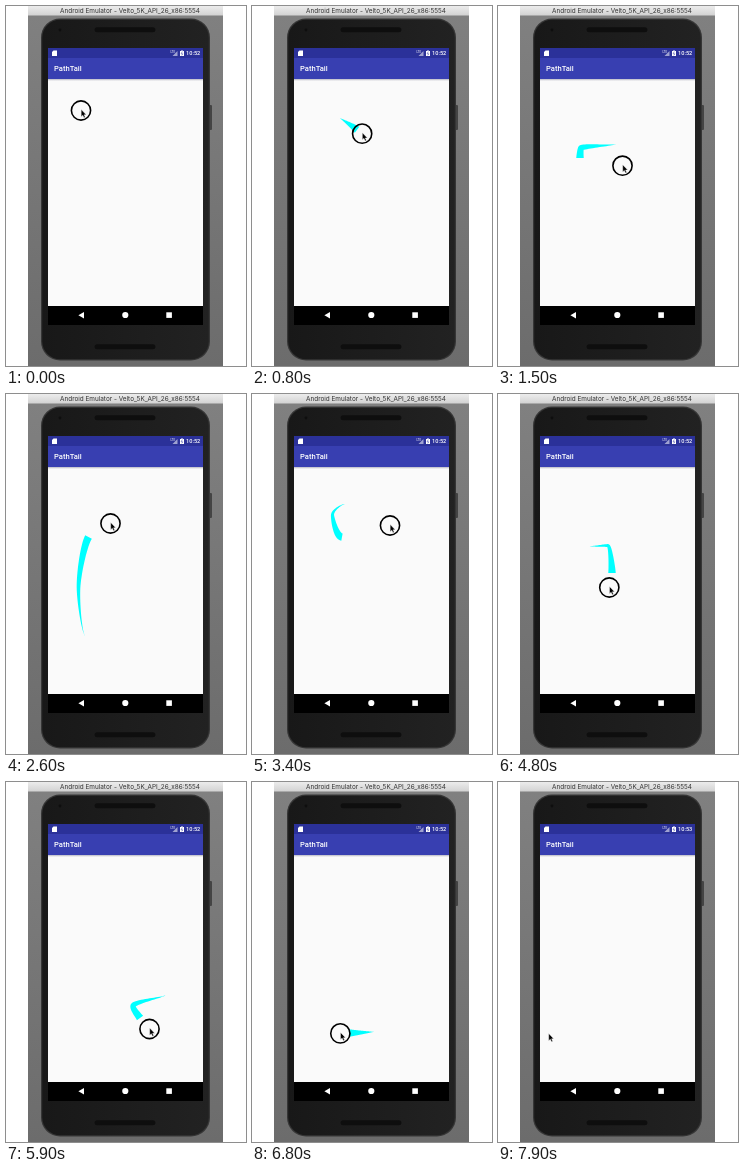
Write an HTML page that moves like this. It is 240 px wide and 360 px high and loops after 8000 ms.

```html
<!DOCTYPE html>
<html lang="en">
<head>
<meta charset="utf-8">
<title>PathTail</title>
<style>
  html, body { margin: 0; width: 100%; height: 100%; overflow: hidden; background: #fff; }
  svg { display: block; width: 100vw; height: 100vh; }
  text { font-family: Roboto, sans-serif; fill: #fff; }
</style>
</head>
<body>
<svg viewBox="0 0 240 360">
  <defs>
    <linearGradient id="bar" x2="0" y2="1"><stop stop-color="#ececec"/><stop offset="1" stop-color="#d2d2d2"/></linearGradient>
    <linearGradient id="desk" x2="0" y2="1"><stop stop-color="#808080"/><stop offset="1" stop-color="#6c6c6c"/></linearGradient>
    <linearGradient id="body"><stop stop-color="#181818"/><stop offset="1" stop-color="#222"/></linearGradient>
    <linearGradient id="shade" x2="0" y2="1"><stop stop-color="#b8b8c4"/><stop offset="1" stop-color="#fafafa"/></linearGradient>
  </defs>
  <rect x="22" y="9" width="195" height="351" fill="url(#desk)"/>
  <rect x="22" width="195" height="9.5" fill="url(#bar)"/>
  <text x="124" y="7" text-anchor="middle" style="font:6.4px Inter,sans-serif;fill:#333">Android Emulator - Velto_5K_API_26_x86:5554</text>

  <!-- phone -->
  <rect x="203" y="99" width="3" height="25" rx="1" fill="#444"/>
  <rect x="35" y="12.5" width="169" height="342" rx="19" fill="#363636"/>
  <rect x="36.2" y="13.7" width="166.6" height="339.6" rx="18" fill="url(#body)"/>
  <g fill="#0e0e0e">
    <rect x="88.6" y="21.2" width="60.8" height="5" rx="2.5"/>
    <rect x="88.6" y="338.2" width="60.8" height="5" rx="2.5"/>
    <circle cx="54" cy="24" r="1.4"/>
  </g>

  <!-- screen -->
  <rect x="42" y="42" width="155" height="258" fill="#fafafa"/>
  <rect x="42" y="42" width="155" height="10.5" fill="#2b3199"/>
  <rect x="42" y="52" width="155" height="21" fill="#383fb1"/>
  <rect x="42" y="73" width="155" height="2" fill="url(#shade)"/>
  <rect x="42" y="300" width="155" height="19" fill="#000"/>
  <g fill="#fff">
    <path d="M47.5 44.5H51V50H46V46Z"/>
    <path d="M171.5 45V50H166.5Z" opacity=".55"/>
    <path d="M175 44.4H177V45H178V50H174V45H175Z"/>
    <path d="M78 306V312.4L72.4 309.2Z"/>
    <circle cx="119.3" cy="309" r="3.1"/>
    <rect x="160.3" y="306.3" width="5.6" height="5.6"/>
  </g>
  <path d="M176.3 45.6L175.1 47.8H176.8L175.8 49.4" fill="none" stroke="#2b3199" stroke-width=".5"/>
  <text x="164.4" y="47" font-size="3">LTE</text>
  <text id="clock" x="194.3" y="49.4" text-anchor="end" font-size="5.6" font-weight="500"></text>
  <text x="48" y="65.2" font-size="7.6" font-weight="500">PathTail</text>

  <path id="tail" fill="#0ff"/>
  <g id="pointer">
    <circle id="ring" r="9.6" fill="none" stroke="#000" stroke-width="1.6"/>
    <path d="M.2 -1V6.2L1.8 4.7L3 7.3L4.2 6.7L3.1 4.3H5.2Z" fill="#000" stroke="#fff" stroke-width=".4"/>
  </g>
</svg>
<script>
const LOOP = 8000, STEP = 100, RELEASE = 7400, MINUTE = 7000;
const NEAR = 100, FAR = 400, WIDTH = 7.5;

// a flick ending at time t: start, bend, brake and stop, at fixed lead times
const flick = (t, ...points) =>
  points.map((p, i) => [t - [FAR, 230, NEAR, 0][i], ...p]);

const keys = [
  [0, 75, 104.5],
  ...flick(1500, [118, 138], [83, 142], [82, 152], [124.5, 159.7]),
  ...flick(2600, [79.5, 242], [72.5, 195], [82.5, 143], [104.5, 129.5]),
  ...flick(3400, [93, 110], [80.5, 121], [90, 143], [138, 131.5]),
  ...flick(4800, [91, 152.5], [110, 151.5], [114, 179], [111.3, 193.5]),
  ...flick(5900, [159.5, 213], [127, 224], [134, 236], [143.5, 247]),
  [7500, 50.5, 252.5],
  [LOOP, 50.5, 252.5]
];
const $ = id => document.getElementById(id);

const slope = (i, k) =>
  keys[i + 1] ? (keys[i + 1][k] - keys[i][k]) / (keys[i + 1][0] - keys[i][0]) : 0;

// harmonic mean keeps the curve from overshooting its keys
function tangent(i, k) {
  const a = i ? slope(i - 1, k) : 0, b = slope(i, k);
  return a * b > 0 ? 2 * a * b / (a + b) : 0;
}

function place(t) {
  let i = 0;
  while (i < keys.length - 2 && keys[i + 1][0] <= t) i++;
  const d = keys[i + 1][0] - keys[i][0], u = (t - keys[i][0]) / d, v = 1 - u;
  return [1, 2].map(k =>
    v * v * (1 + 2 * u) * keys[i][k] + u * u * (3 - 2 * u) * keys[i + 1][k] +
    d * u * v * (v * tangent(i, k) - u * tangent(i + 1, k)));
}

// ribbon along the recent path, widening with the distance covered
function tailPath(t) {
  const end = t - NEAR, start = Math.max(0, t - FAR), n = 40;
  if (end <= start || t >= RELEASE) return "";
  const line = Array.from({ length: n + 1 }, (_, i) => place(start + (end - start) * i / n));
  const run = [0];
  for (let i = 1; i <= n; i++)
    run[i] = run[i - 1] + Math.hypot(line[i][0] - line[i - 1][0], line[i][1] - line[i - 1][1]);
  const left = [], right = [];
  line.forEach(([x, y], i) => {
    const a = line[Math.max(0, i - 1)], b = line[Math.min(n, i + 1)];
    const dx = b[0] - a[0], dy = b[1] - a[1];
    const r = WIDTH / 2 * run[i] / (run[n] || 1) / (Math.hypot(dx, dy) || 1);
    left.push([x - dy * r, y + dx * r]);
    right.unshift([x + dy * r, y - dx * r]);
  });
  return "M" + left.concat(right).map(p => p.map(c => c.toFixed(2))).join("L") + "Z";
}

function draw(now) {
  const t = Math.floor(now % LOOP / STEP) * STEP;
  $("pointer").setAttribute("transform", `translate(${place(t)})`);
  $("ring").style.display = t < RELEASE ? "" : "none";
  $("tail").setAttribute("d", tailPath(t));
  $("clock").textContent = t < MINUTE ? "10:52" : "10:53";
}

let began;
function tick(now) {
  began ??= now;
  draw(now - began);
  requestAnimationFrame(tick);
}
draw(0);
requestAnimationFrame(tick);
</script>
</body>
</html>
```
